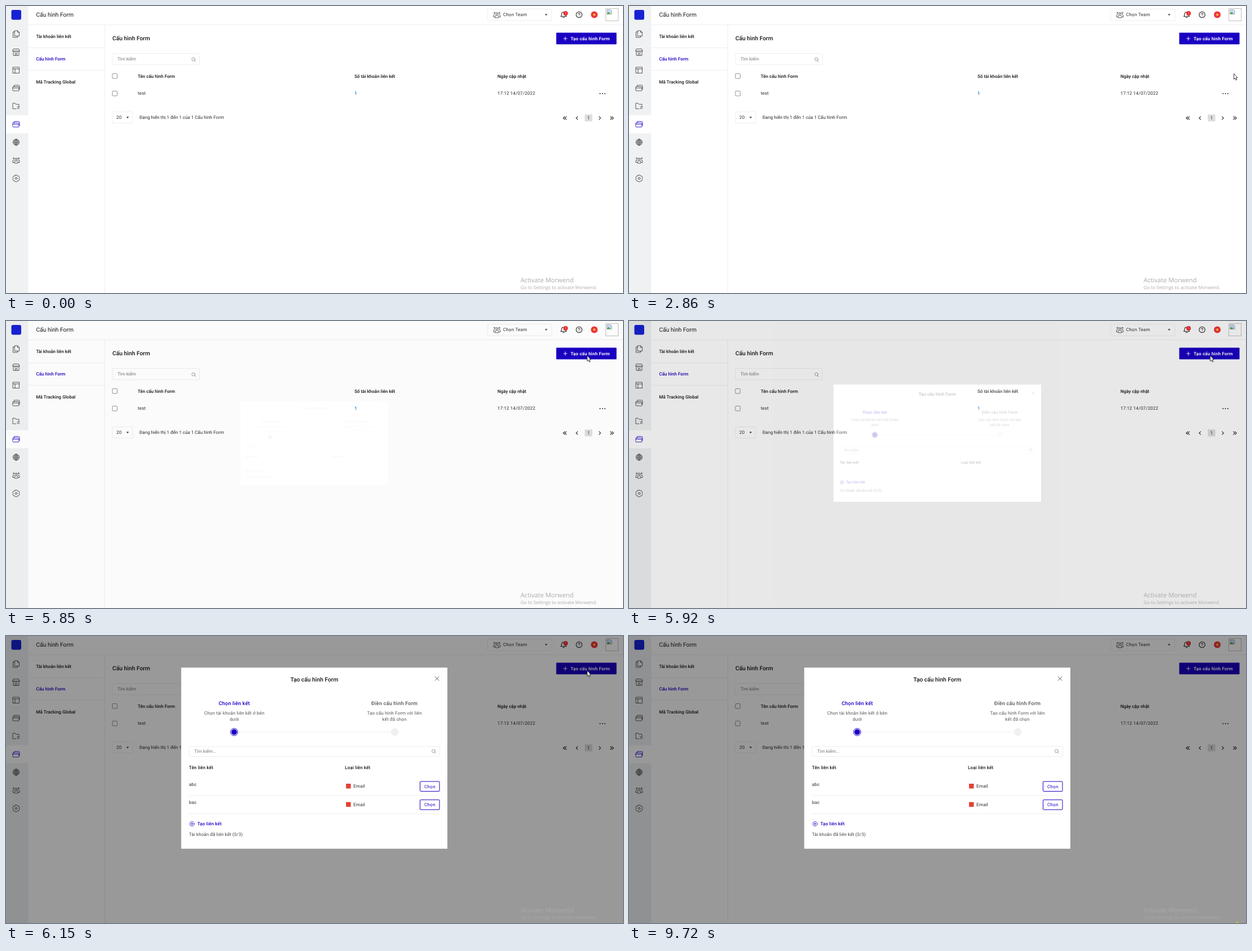
Write an HTML page that moves like this. It is 1096 by 511 pixels and loops after 9.78 s.

```html
<!DOCTYPE html>
<html lang="vi">
<head>
<meta charset="utf-8">
<title>Cấu hình Form</title>
<style>
html, body { margin: 0; width: 100%; height: 100%; overflow: hidden; background: #fff; }
svg { display: block; width: 1096px; height: 511px; font: 8px Roboto, sans-serif; text-rendering: geometricPrecision; }
text { fill: #2b2b2b; white-space: pre; }
.m { font-weight: 500; fill: #161616; }
.h { font-size: 10.28px; font-weight: 500; fill: #161616; }
.step { font-size: 9.14px; font-weight: 500; letter-spacing: .2px; }
.s { letter-spacing: .16px; }
.c { text-anchor: middle; }
.g { fill: #777; }
.b { fill: #1a00c3; }
.i { fill: none; stroke: #333; stroke-width: .8; stroke-linejoin: round; stroke-linecap: round; }
.i.blue { stroke: #1a00c3; }
.l { fill: none; stroke: #eee; }
.w { font-family: "Open Sans", "Noto Sans", sans-serif; fill: #aaa; }
</style>
</head>
<body>
<svg viewBox="0 0 1096 511">
  <defs>
    <g id="cards"><path d="M-3.5-2.5V-5H4.5Q6-5 6-3.5V2.5H5M-5-2.5H3.5Q5-2.5 5-1.5V4Q5 5 4 5H-5Q-6 5-6 4V-1.5Q-6-2.5-5-2.5ZM-6 0H5"/></g>
    <g id="team"><circle cy="-2.2" r="1.7"/><circle cx="-4.4" cy="-3.2" r="1.1"/><circle cx="4.4" cy="-3.2" r="1.1"/><path d="M-3 5V3Q-3 1 0 1T3 3V5ZM-3.7 4H-6V1.5Q-6-.5-3.2-.3M3.7 4H6V1.5Q6-.5 3.2-.3"/></g>
    <g id="find"><circle cx="-.6" cy="-.6" r="2.9"/><path d="M1.5 1.5 3.7 3.7"/></g>
    <path id="caret" d="M-2.3-1.3H2.3L0 1.7Z" fill="#444"/>
    <path id="chev" d="M1.5-2.7-1.3 0 1.5 2.7"/>
    <rect id="box" x=".5" y=".5" width="8.5" height="8.5" rx="1" fill="#fff" stroke="#767676" stroke-width=".8"/>
    <g id="row">
      <rect x="604" y="263" width="8.5" height="8.5" fill="#e44234"/>
      <text class="s" x="617" y="270.4">Email</text>
      <rect x="735.5" y="259" width="34.5" height="17.5" rx="1" fill="#fff" stroke="#1a00c3"/>
      <text class="b c" x="753" y="270.8" letter-spacing=".3">Chọn</text>
      <path class="l" d="M325 284H770.5"/>
    </g>
  </defs>

  <rect width="1096" height="511" fill="#fff"/>
  <rect width="39.5" height="511" fill="#f0f1f3"/>
  <rect y="194.5" width="39.5" height="32" fill="#fff"/>
  <path class="l" d="M39.5 33.5H1096M175.5 34V511M40 74.5H175M40 114.5H175"/>
  <rect x="9.5" y="7" width="17.5" height="17.5" rx="3" fill="#1722d4"/>

  <g class="i">
    <path transform="translate(18 50)" d="M-2.5-6H2.5L5.5-3V3.5H-2.5ZM2.5-6V-3H5.5M-2.5-4H-5.5V6H2.5V3.5"/>
    <path transform="translate(18 82)" d="M-4.5-5.5H4.5L6-2V-1Q5 1 3.5-.5 2 1 0-.5-2 1-3.5-.5-5 1-6-1V-2ZM-5 1V6H5V1M-1.5 6V2.5H1.5V6M-6-2H6"/>
    <path transform="translate(18 114)" d="M-5.5-5H5.5V5.5H-5.5ZM-5.5-2H5.5M-2-2V5.5"/>
    <use href="#cards" x="18" y="146"/>
    <path transform="translate(18 178)" d="M0 5H-6V-5H-2L-.5-3H5V-.5M2 1.5H6L5 .5M6 4H2L3 5"/>
    <g transform="translate(18 242.5)"><circle r="5.5"/><ellipse rx="2.4" ry="5.5"/><path d="M-5.5 0H5.5M0-5.5V5.5M-4.8-2.6H4.8M-4.8 2.6H4.8"/></g>
    <use href="#team" x="18" y="274.5"/>
    <g transform="translate(18 307)"><circle r="1.8"/><path d="M-1.5-6H1.5L2.3-4.3 4.4-4.4 6-1.6 5 0 6 1.6 4.4 4.4 2.3 4.3 1.5 6H-1.5L-2.3 4.3-4.4 4.4-6 1.6-5 0-6-1.6-4.4-4.4-2.3-4.3Z"/></g>
    <use href="#team" x="872" y="15.5"/>
    <path d="M985.5 18.5Q987 17 987 14.5 987 11 990.5 11T994 14.5Q994 17 995.5 18.5ZM989 20.5H992" stroke="#222" stroke-width="1.1"/>
    <circle cx="1018" cy="15.5" r="5.2" stroke="#222" stroke-width="1.1"/>
    <path d="M1016.3 14.2Q1016.4 12.7 1018 12.7T1019.6 14.2Q1019.5 15.2 1018 16M1018 18.2V18.3" stroke="#222" stroke-width="1"/>
  </g>
  <use class="i blue" href="#cards" x="18" y="210.5"/>

  <text x="53.5" y="19" class="h" style="font-weight:400">Cấu hình Form</text>
  <rect class="l" x="855.5" y="5.5" width="114" height="20.5" rx="1"/>
  <text x="883" y="18" letter-spacing=".25">Chọn Team</text>
  <use href="#caret" x="959.5" y="15.5"/>
  <circle cx="994" cy="13" r="4" fill="#ee2b2b"/>
  <text class="c" x="994" y="15" style="font-size:5.5px;fill:#fff">1</text>
  <circle cx="1045" cy="15.5" r="6" fill="#f0323c"/>
  <path d="M1045 12.3 1045.8 14.5H1048L1046.2 15.9 1046.9 18.1 1045 16.8 1043.1 18.1 1043.8 15.9 1042 14.5H1044.2Z" fill="#ffd83b"/>
  <rect x="1065.5" y="4.5" width="22" height="22" fill="#fff" stroke="#c0c0c0"/>
  <path d="M1067.5 6.5H1074L1076 8.5V14.5H1067.5Z" fill="#c6dcf8" stroke="#999" stroke-width=".7"/>
  <path d="M1068 14.2V12.5L1071 10.5 1073.5 14.2Z" fill="#52a843"/>

  <text class="m" x="53.5" y="56.7">Tài khoản liên kết</text>
  <text class="m" x="53.5" y="97.4" style="fill:#1a00c3">Cấu hình Form</text>
  <text class="m" x="53.5" y="137.5" letter-spacing=".05">Mã Tracking Global</text>
  <text class="h" x="189" y="61.3">Cấu hình Form</text>
  <rect id="btn" x="977.4" y="47.5" width="107.1" height="20.7" rx="1"/>
  <path d="M990 58H997M993.5 54.5V61.5" stroke="#fff" stroke-width=".9"/>
  <text x="1003" y="60.5" style="font-weight:700;fill:#fff;letter-spacing:.2px">Tạo cấu hình Form</text>

  <rect class="l" x="189" y="84.5" width="154.5" height="20" rx="1"/>
  <text class="g" x="198" y="97.4">Tìm kiếm</text>
  <use class="i" href="#find" x="333.5" y="95.5" style="stroke:#888"/>
  <use href="#box" x="188.5" y="120"/>
  <use href="#box" x="188.5" y="151"/>
  <text class="m" x="234" y="127.5">Tên cấu hình Form</text>
  <text class="m" x="619" y="127.5">Số tài khoản liên kết</text>
  <text class="m" x="873" y="127.5">Ngày cập nhật</text>
  <text class="s" x="234" y="158.4">test</text>
  <text x="619" y="158.4" style="fill:#1677c8;font-weight:500">1</text>
  <text class="s" x="873" y="158.4">17:12 14/07/2022</text>
  <path d="M1055.2 156V156M1059.5 156V156M1063.8 156V156" stroke="#222" stroke-width="2" stroke-linecap="round"/>
  <rect class="l" x="189" y="188.5" width="36" height="20" rx="1"/>
  <text x="196" y="201.4" letter-spacing=".3">20</text>
  <use href="#caret" x="216" y="198.5"/>
  <text x="237" y="201.4">Đang hiển thị 1 đến 1 của 1 Cấu hình Form</text>
  <rect x="1028" y="193" width="13.5" height="12.5" rx="1" fill="#dedede"/>
  <text class="c" x="1034.7" y="202">1</text>
  <g class="i" style="stroke-width:1.1">
    <use href="#chev" x="991" y="199.5"/><use href="#chev" x="994" y="199.5"/><use href="#chev" x="1014" y="199.5"/>
    <g transform="translate(1055 199.5) scale(-1 1)"><use href="#chev"/><use href="#chev" x="-20"/><use href="#chev" x="-23"/></g>
  </g>

  <g id="modal">
    <path id="shade" fill="#000" fill-opacity=".4" fill-rule="evenodd"/>
    <rect id="panel" x="311.5" y="56.5" width="472.5" fill="#fff"/>
    <text class="h c" x="547.7" y="81.3">Tạo cấu hình Form</text>
    <path class="i" d="M762.3 72.5 769 79.2M769 72.5 762.3 79.2"/>
    <text class="step c" x="405.5" y="123.3" style="fill:#1a00c3">Chọn liên kết</text>
    <text class="step c" x="690" y="123.3" style="fill:#555">Điền cấu hình Form</text>
    <g class="s c">
      <text x="405.5" y="139.8" style="fill:#555">Chọn tài khoản liên kết ở bên</text>
      <text x="405.5" y="151.2" style="fill:#555">dưới</text>
      <text x="690" y="139.8" style="fill:#555">Tạo cấu hình Form với liên</text>
      <text x="690" y="151.2" style="fill:#555">kết đã chọn</text>
    </g>
    <path class="l" d="M413 171H683"/>
    <circle cx="405.3" cy="171" r="6.5" fill="#fff" stroke="#1a00c3"/>
    <circle cx="405.3" cy="171" r="5" fill="#1a00c3"/>
    <circle cx="690.5" cy="171" r="6.8" fill="#f0f0f0"/>
    <rect class="l" x="325.5" y="196.5" width="445" height="18" rx="1"/>
    <text class="g" x="334.3" y="208">Tìm kiếm...</text>
    <use class="i" href="#find" x="760" y="205.5" style="stroke:#888"/>
    <text class="m s" x="325" y="236.7">Tên liên kết</text>
    <text class="m s" x="602" y="236.7">Loại liên kết</text>
    <g id="rows">
      <use href="#row"/><use href="#row" y="32.7"/>
      <text class="s" x="325" y="266.8">abc</text>
      <text class="s" x="325" y="299.4">bac</text>
    </g>
    <g id="foot">
      <g class="i blue"><circle cx="330.5" cy="334.5" r="4"/><path d="M328.5 334.5H332.5M330.5 332.5V336.5"/></g>
      <text class="m" x="340" y="336.8" style="fill:#1a00c3;letter-spacing:.18px">Tạo liên kết</text>
      <text x="325" y="355.5" letter-spacing=".1" style="fill:#444">Tài khoản đã liên kết (0/3)</text>
    </g>
  </g>

  <text class="w" x="914" y="491.6" style="font-size:11.2px">Activate Morwend</text>
  <text class="w" x="914" y="503.6" style="font-size:8.2px">Go to Settings to activate Morwend.</text>
  <ellipse id="glow" cx="1080" cy="511" rx="3" ry="2" fill="#c8c020"/>
  <g id="cursor" fill="#fff" stroke="#111" stroke-width=".8" stroke-linejoin="round">
    <path id="arrow" d="M.4.6V10.4L2.6 8.4 4.1 12 5.7 11.3 4.2 7.9H7Z"/>
    <path id="hand" d="M-1.2 8V1.3Q-1.2.4-.2.4T.8 1.3V5Q2.4 4.5 2.6 5.6 4 5.2 4.2 6.3 5.6 6.2 5.6 7.5V10.5Q5.2 12 4.6 14H-1Q-2 11.8-3.7 9.3-4 7.6-2.5 7.4Z"/>
  </g>
</svg>
<script>
const LOOP = 9780;
const $ = id => document.getElementById(id);
const set = (id, name, value) => $(id).setAttribute(name, value);
const show = (id, on) => { $(id).style.display = on ? '' : 'none'; };

// start, end, number of steps, way points
const moves = [
  [130, 580, 8, [[923, 478], [640, 395], [380, 335], [285, 326], [265, 331]]],
  [1710, 2050, 6, [[264, 335], [330, 323], [520, 332], [760, 358], [944, 379]]],
  [2380, 3220, 13, [[950, 365], [1010, 260], [1080, 150], [1068, 90], [1046, 62], [1041, 59]]],
  [3880, 3950, 2, [[1036, 60], [1032, 60]]],
  [4680, 5650, 15, [[1030, 66], [960, 105], [800, 205], [675, 280], [613, 298]]],
  [5710, 5711, 2, [[655, 258], [655, 258]]],
  [5850, 5851, 2, [[1032, 61], [1032, 61]]],
  [6990, 7950, 13, [[1030, 62], [920, 67], [810, 74], [765, 76], [761, 75]]],
  [8040, 8370, 5, [[785, 120], [860, 230], [950, 360], [1030, 455], [1080, 515]]]
];

// time, scale, opacity
const zoom = [[5850, .5545, .035], [5920, .78, .23], [6020, .949, .5], [6150, 1, 1]];

const latest = (list, t) => list.filter(e => e[0] <= t).pop();

function cursorAt(t) {
  const move = latest(moves, t);
  if (!move) return null;
  const [start, end, steps, pts] = move;
  const k = Math.min(steps - 1, Math.floor((t - start) / (end - start) * (steps - 1) + .01));
  const p = k / (steps - 1) * (pts.length - 1);
  const i = Math.min(pts.length - 2, Math.floor(p));
  return pts[i].map((v, axis) => v + (pts[i + 1][axis] - v) * (p - i));
}

function drawModal(t) {
  const state = latest(zoom, t);
  show('modal', state);
  if (!state) return false;
  const [, scale, opacity] = state;
  const full = scale === 1, height = full ? 322 : 267;
  set('modal', 'opacity', opacity);
  set('modal', 'transform', `translate(547.75 217.5) scale(${scale}) translate(-547.75 ${-56.5 - height / 2})`);
  set('panel', 'height', height);
  set('shade', 'd', `M-2000-2000H3000V3000H-2000ZM311.5 56.5H784V${56.5 + height}H311.5Z`);
  show('rows', full);
  set('foot', 'transform', `translate(0 ${height - 322})`);
  return true;
}

function draw(now) {
  const t = now % LOOP;
  const open = drawModal(t), pos = cursorAt(t);
  const over = (x, y, w, h) => pos && pos[0] >= x && pos[0] <= x + w && pos[1] >= y && pos[1] <= y + h;
  const hover = !open && over(977, 47, 108, 21);
  const hand = hover || (open && over(757, 67, 18, 18));
  set('btn', 'fill', hover ? '#0037d8' : '#1a00c3');
  show('cursor', pos);
  if (pos) set('cursor', 'transform', `translate(${pos.map(Math.round)})`);
  show('arrow', !hand);
  show('hand', hand);
  show('glow', t >= 9640);
}

let begin;
function tick(now) {
  begin ??= now;
  draw(now - begin);
  requestAnimationFrame(tick);
}
draw(0);
requestAnimationFrame(tick);
</script>
</body>
</html>
```
